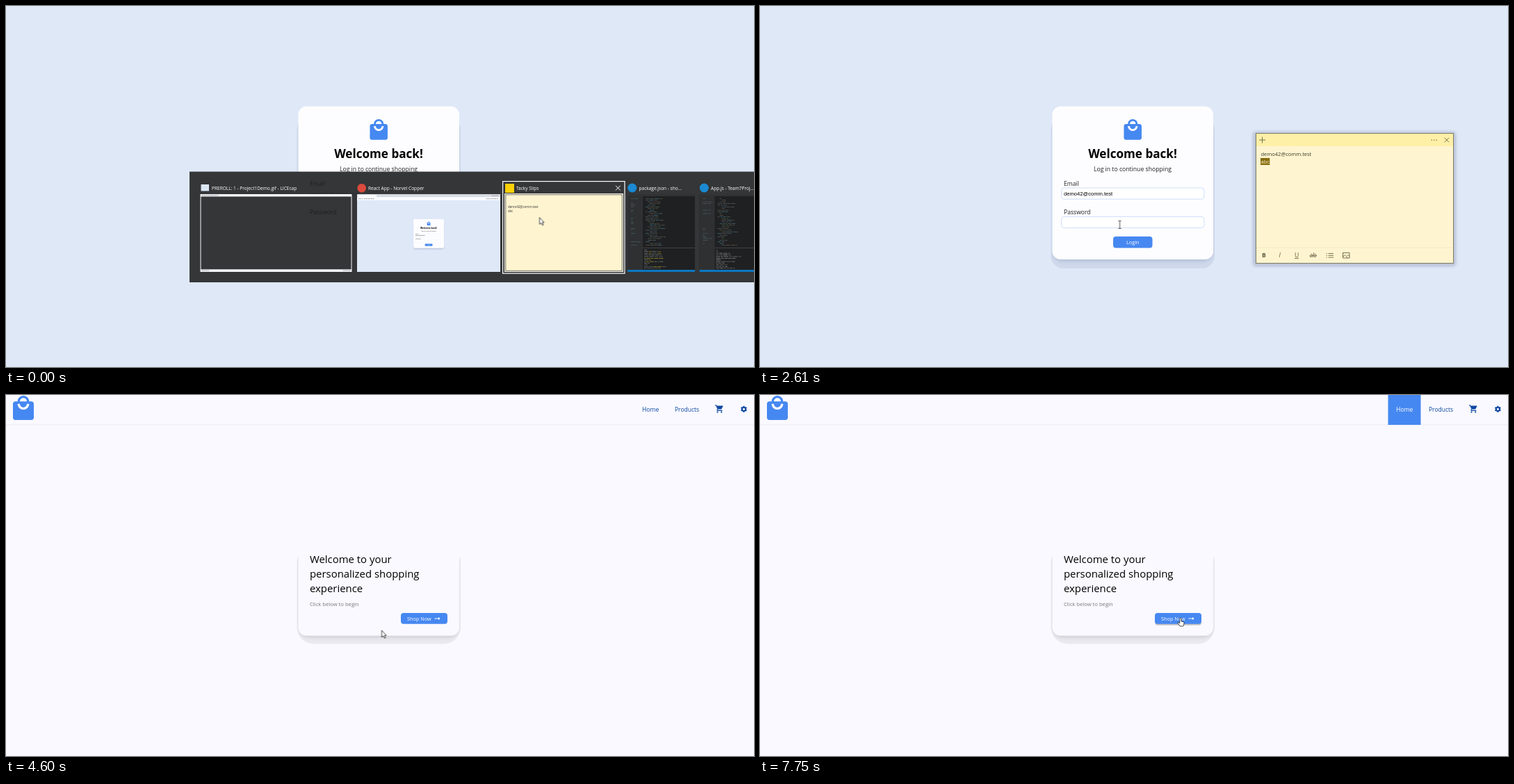
Animation of 1076x520 px, one loop 7.99 s. Source, as an HTML page:

```html
<!DOCTYPE html>
<html lang="en">
<head>
<meta charset="utf-8">
<title>Shop login</title>
<style>
html, body { margin: 0; width: 100%; height: 100%; overflow: hidden; background: #dfe8f7; }
svg { display: block; width: 100%; height: 100%; }
text { font-family: "Open Sans", "Noto Sans", sans-serif; white-space: pre; }
.mid { text-anchor: middle; }
.field { fill: #fff; stroke: #cfdff8; }
.value { font: 7.6px "Liberation Sans", Arial, sans-serif; }
.blue { fill: #4688f1; }
.navy { fill: #0d47a1; }
.label text { font-size: 6.55px; fill: #fff; }
.line { fill: none; stroke: #6b6545; stroke-width: .9; }
.ring { fill: none; stroke: #101014; stroke-width: 1.3; }

.step { animation: 7.99s step-end infinite; }
#switcher { animation-name: switcher; }
#note { animation-name: note; }
#picked { animation-name: picked; }
#focus { animation-name: focus; }
#caret { animation-name: caret; }
#dots { animation-name: dots; }
#press { animation-name: press; }
#home { animation-name: home; }
#lift { animation-name: lift; }
#arrow { animation-name: arrow; }
#beam { animation-name: beam; }
#resize { animation-name: resize; }
#hand { animation-name: hand; }
#active { animation: active 7.99s linear infinite; }
#pointer { animation: pointer 7.99s linear infinite; }

@keyframes switcher { 0% { opacity: 1 } .751%, 100% { opacity: 0 } }
@keyframes note { 0% { opacity: 0 } .751% { opacity: 1 } 33.417%, 100% { opacity: 0 } }
@keyframes picked {
  0% { clip-path: inset(0 0 0 100%) }
  13.4% { clip-path: inset(0 0 0 66%) }
  15% { clip-path: inset(0 0 0 33%) }
  16.2%, 100% { clip-path: inset(0) }
}
@keyframes focus { 0% { opacity: 0 } 33.417% { opacity: 1 } 52.941%, 100% { opacity: 0 } }
@keyframes caret { 0% { opacity: 0 } 34.168% { opacity: 1 } 38.798%, 100% { opacity: 0 } }
@keyframes dots {
  0% { clip-path: inset(0 100% 0 0) }
  38.798% { clip-path: inset(0 66% 0 0) }
  40.3% { clip-path: inset(0 33% 0 0) }
  41.802%, 100% { clip-path: inset(0) }
}
@keyframes press { 0% { opacity: 0 } 52.941%, 100% { opacity: 1 } }
@keyframes home { 0% { opacity: 0 } 57.572%, 100% { opacity: 1 } }
@keyframes lift { 0% { opacity: 0 } 95.494%, 100% { opacity: 1 } }
@keyframes active { 0%, 58.323% { opacity: 0 } 59.7%, 100% { opacity: 1 } }
@keyframes arrow {
  0% { opacity: 1 } .751% { opacity: 0 } 20.901% { opacity: 1 } 31.915% { opacity: 0 }
  43.2% { opacity: 1 } 49.186% { opacity: 0 } 57.572% { opacity: 1 } 95.494%, 100% { opacity: 0 }
}
@keyframes beam {
  0% { opacity: 0 } .751% { opacity: 1 } 17.6% { opacity: 0 }
  31.915% { opacity: 1 } 43.2%, 100% { opacity: 0 }
}
@keyframes resize { 0% { opacity: 0 } 17.6% { opacity: 1 } 20.901%, 100% { opacity: 0 } }
@keyframes hand {
  0% { opacity: 0 } 49.186% { opacity: 1 } 57.572% { opacity: 0 } 95.494%, 100% { opacity: 1 }
}
@keyframes pointer {
  0%, .751% { transform: translate(767.5px, 304.5px) }
  9.637%, 11.139% { transform: translate(744px, 228px) }
  18.6%, 20.901% { transform: translate(709.5px, 228.5px) }
  31.289% { transform: translate(519px, 295px) }
  31.915%, 41.9% { transform: translate(517.5px, 315px) }
  47.685%, 48.8% { transform: translate(553px, 349px) }
  49.186% { transform: translate(548px, 345px) }
  52.941%, 64.33% { transform: translate(540.5px, 339px) }
  67% { transform: translate(338px, 306px) }
  70% { transform: translate(590px, 308px) }
  72% { transform: translate(606px, 165px) }
  73.842% { transform: translate(226px, 84px) }
  77.5% { transform: translate(60px, 34px) }
  78.4% { transform: translate(27px, 36px) }
  79.099%, 79.85% { transform: translate(33.5px, 44px) }
  84.23% { transform: translate(712px, 127px) }
  87% { transform: translate(806px, 79px) }
  90% { transform: translate(688px, 192px) }
  92% { transform: translate(612px, 240px) }
  93.992%, 95.4% { transform: translate(600px, 313px) }
  95.494% { transform: translate(603px, 321px) }
  96.996%, 100% { transform: translate(605px, 321px) }
}
</style>
</head>
<body>
<svg viewBox="0 0 1076 520" preserveAspectRatio="none">
  <defs>
    <path id="bag" class="blue" d="M19 6h-2c0-2.76-2.24-5-5-5S7 3.24 7 6H5c-1.1 0-2 .9-2 2v12c0 1.1.9 2 2 2h14c1.1 0 2-.9 2-2V8c0-1.1-.9-2-2-2zm-7-3c1.66 0 3 1.34 3 3H9c0-1.66 1.34-3 3-3zm0 10c-2.76 0-5-2.24-5-5h2c0 1.66 1.34 3 3 3s3-1.34 3-3h2c0 2.76-2.24 5-5 5z"/>
    <filter id="soft" x="-10%" y="-10%" width="120%" height="120%"><feGaussianBlur stdDeviation=".5"/></filter>
    <filter id="blur" x="-10%" y="-10%" width="120%" height="120%"><feGaussianBlur stdDeviation="2"/></filter>
  </defs>

  <rect width="1076" height="520" fill="#dfe8f7"/>

  <g id="login">
    <rect x="418.5" y="160" width="235.5" height="218" rx="18" fill="#1e3a6e" opacity=".08" filter="url(#soft)"/>
    <rect x="422" y="170" width="228" height="198.5" rx="13" fill="#1e3a6e" opacity=".13" filter="url(#blur)"/>
    <rect x="420.5" y="144.5" width="231.5" height="220.5" rx="12" fill="#fdfdff"/>
    <use href="#bag" transform="translate(519.2 161.6) scale(1.417)"/>
    <text class="mid" x="536" y="219" font-size="17.1" font-weight="700">Welcome back!</text>
    <text class="mid" x="536" y="238.3" font-size="8.67" fill="#222">Log in to continue shopping</text>
    <text x="437" y="259.3" font-size="8.6" fill="#222">Email</text>
    <rect class="field" x="433.5" y="262" width="205.5" height="16.2" rx="4"/>
    <text class="value" x="437" y="273">demo42@comm.test</text>
    <text x="437" y="300.3" font-size="8.6" fill="#222">Password</text>
    <rect class="field" x="433.5" y="303.4" width="205.5" height="16.2" rx="4"/>
    <rect id="focus" class="ring step" x="433.5" y="303" width="206" height="17" rx="4"/>
    <path id="caret" class="step" d="M437.5 307v9" stroke="#000" stroke-width=".8"/>
    <g id="dots" class="step">
      <circle cx="438.4" cy="311.3" r="1.3"/><circle cx="441.2" cy="311.3" r="1.3"/><circle cx="444" cy="311.3" r="1.3"/>
    </g>
    <rect class="blue" x="508" y="332" width="56.5" height="16.5" rx="4"/>
    <text class="mid" x="536.3" y="343.2" font-size="7.4" fill="#fff">Login</text>
    <rect id="press" class="ring step" x="507.6" y="331.8" width="57" height="16.8" rx="2"/>
  </g>

  <g id="note" class="step">
    <rect x="709" y="181" width="292" height="194" rx="4" fill="#1e2f55" opacity=".2" filter="url(#blur)"/>
    <rect x="713.5" y="183.5" width="284" height="187" fill="#fef5d0"/>
    <rect x="713.5" y="183.5" width="284" height="18.5" fill="#fff0a8"/>
    <path d="M714 348h283" stroke="#f3eac2"/>
    <rect x="713.5" y="183.5" width="284" height="187" fill="none" stroke="#807b62"/>
    <path class="line" d="M718 193h9M722.5 188.5v9M984.5 189.7l6.6 6.6m0-6.6l-6.6 6.6"/>
    <path class="line" d="M965.5 193.2h8.5" stroke-dasharray="1.3 2.2" style="stroke-width:1.3"/>
    <text x="720.5" y="216.3" font-size="7.5" fill="#3b3829">demo42@comm.test</text>
    <text x="720.5" y="227" font-size="7.5" fill="#3b3829">abc</text>
    <g id="picked" class="step">
      <rect x="720" y="218.8" width="13.5" height="10.2" fill="#866c0c"/>
      <text x="720.5" y="227" font-size="7.5" fill="#fff6d2">abc</text>
    </g>
    <g fill="#5c573e" font-size="8.5">
      <text x="722" y="362.4" font-weight="700">B</text>
      <text x="746.5" y="362.4" font-style="italic">I</text>
      <text x="769" y="362">U</text>
      <text x="790.8" y="362.4">ab</text>
    </g>
    <path class="line" d="M769 363.5h6M790.5 359.6h10.5M817.5 356.5h7.5m-7.5 2.8h7.5m-7.5 2.8h7.5M814.5 356.5h1.3m-1.3 2.8h1.3m-1.3 2.8h1.3M838.5 355.5h9.5v7.5h-9.5zl0 6 3-3 4 4.5m-1-3 1.5-1.5 2 2"/>
  </g>

  <g id="switcher" class="step">
    <rect x="264" y="238.6" width="812" height="159.4" fill="#343638"/>
    <g font-size="8.6" fill="#1d1f20">
      <text x="437" y="259.3">Email</text>
      <text class="value" x="437" y="273" fill="#292b2d">demo42@comm.test</text>
    </g>
    <rect x="279.5" y="271" width="218" height="112" fill="#f5f7fa"/>
    <rect x="280.5" y="274.5" width="216" height="104.8" fill="#343638"/>
    <path d="M282 272.8h24M282 381h10M485 381h11" stroke="#777" stroke-width=".8" stroke-dasharray="2 .6"/>
    <text x="437" y="300.3" font-size="8.6" fill="#1d1f20">Password</text>

    <rect x="505" y="271" width="206" height="112" fill="#dfe8f7"/>
    <rect x="505" y="271" width="206" height="4.5" fill="#d6dae1"/>
    <rect x="505" y="275.2" width="206" height="4.6" fill="#fbfcfe"/>
    <rect x="506" y="272" width="27" height="4" fill="#fbfcfe"/>
    <path d="M507 277.6h6m2 0h15M691 277.6h17M699 273.2h9" stroke="#777" stroke-width=".9" stroke-dasharray="1.5 1"/>
    <use href="#login" transform="translate(506.2 279.45) scale(.19)"/>

    <rect x="714.6" y="252.6" width="175.4" height="132.6" fill="none" stroke="#fff" stroke-width="1.2"/>
    <rect x="717.6" y="270.6" width="169.8" height="111.9" fill="#fef5d0" stroke="#fffbe8"/>
    <rect x="718.8" y="271.8" width="167.4" height="109.5" fill="none" stroke="#5d5f61" stroke-width=".9"/>
    <text x="722" y="290.5" font-size="4.5" fill="#333">demo42@comm.test</text>
    <text x="722" y="296.5" font-size="4.5" fill="#333">abc</text>
    <path d="M877 258.7l6.8 6.8m0-6.8l-6.8 6.8" stroke="#fff"/>

    <g id="editors"></g>

    <g class="label">
      <rect x="280.5" y="257" width="11.5" height="9.5" fill="#dce6f4"/>
      <text x="296" y="264.8">PREROLL: 1 - Project1Demo.gif - LICEcap</text>
      <circle cx="511.7" cy="262.2" r="6.3" fill="#db4a3d"/>
      <text x="521" y="264.8">React App - Norvel Copper</text>
      <rect x="718" y="256" width="13" height="13" fill="#fbd008"/>
      <text x="734" y="264.8">Tacky Slips</text>
      <circle cx="900.8" cy="262" r="6.5" fill="#1a8ad4"/>
      <text x="910.5" y="264.8">package.json - sho...</text>
      <circle cx="1004.3" cy="262" r="6.5" fill="#1a8ad4"/>
      <text x="1014" y="264.8">App.js - Team7Proj...</text>
    </g>
  </g>

  <g id="home" class="step">
    <rect width="1076" height="520" fill="#f9f9ff"/>
    <path d="M0 43h1076" stroke="#ebebf2"/>
    <use href="#bag" transform="translate(5 -.7) scale(1.667)"/>
    <text class="navy" x="915" y="24.3" font-size="8.6">Home</text>
    <g id="active">
      <rect class="blue" x="903.5" y="0" width="47" height="43"/>
      <text x="915" y="24.3" font-size="8.6" fill="#fff">Home</text>
    </g>
    <text class="navy" x="962" y="24.3" font-size="8.5">Products</text>
    <path class="navy" transform="translate(1019.5 13.2) scale(.571)" d="M7 18a2 2 0 1 0 0 4 2 2 0 0 0 0-4zM1 2v2h2l3.6 7.59-1.35 2.45c-.7 1.3.3 2.96 1.75 2.96h12v-2H7.42c-.2 0-.3-.2-.22-.37l.9-1.63h7.45c.75 0 1.41-.41 1.75-1.03l3.58-6.49c.4-.7-.1-1.48-.88-1.48H5.21l-.94-2zM17 18a2 2 0 1 0 0 4 2 2 0 0 0 0-4z"/>
    <g fill="none" stroke="#0d47a1">
      <circle cx="1061.4" cy="20.3" r="2.6" stroke-width="2"/>
      <circle cx="1061.4" cy="20.3" r="3.9" stroke-width="1.4" pathLength="12" stroke-dasharray="1 1" stroke-dashoffset="1.5"/>
    </g>

    <rect x="418.5" y="217" width="235.5" height="141.5" rx="24" fill="#000" opacity=".06" filter="url(#soft)"/>
    <rect x="422" y="225" width="228" height="125" rx="13" fill="#000" opacity=".09" filter="url(#blur)"/>
    <rect x="420.5" y="207" width="231.5" height="139.8" rx="12" fill="#f9f9ff"/>
    <g font-size="14.9">
      <text x="437" y="242">Welcome to your</text>
      <text x="437" y="263">personalized shopping</text>
      <text x="437" y="283.8">experience</text>
    </g>
    <text x="437" y="303.7" font-size="7.65" fill="#77777d">Click below to begin</text>
    <rect id="lift" class="step" x="568" y="316" width="67" height="15.8" rx="4" fill-opacity=".22" filter="url(#soft)"/>
    <rect class="blue" x="568" y="314" width="67" height="15.7" rx="4"/>
    <text x="577" y="325" font-size="7.3" fill="#fff">Shop Now</text>
    <path d="M616.5 322h6" stroke="#fff"/>
    <path d="M622 320l2.6 2-2.6 2z" fill="#fff"/>
  </g>

  <g id="pointer" fill="#fff" stroke="#1c1c1c" stroke-width=".8" stroke-linejoin="round">
    <path id="arrow" class="step" d="M0 0V10L2.3 8l1.7 3.4 1.6-.7L4 7.3H6.6z"/>
    <path id="beam" class="step" fill="none" d="M-2-5.5h1.4l.6.5.6-.5H2M-2 5.5h1.4l.6-.5.6.5H2M0-5V5"/>
    <path id="resize" class="step" d="M-6 0l3-3v2h6v-2l3 3-3 3v-2h-6v2z"/>
    <path id="hand" class="step" d="M-1.2 1.2a1.1 1.1 0 0 1 2.2 0V5l3.2.7q1 .3.9 1.4l-.6 3.2-.8 1.7h-4.6l-3-4.2q-.5-1.2.6-1.5l2.1 1.5z"/>
  </g>
</svg>
<script>
const editors = document.getElementById('editors');
let seed = 7;
const rand = () => (seed = (seed * 16807) % 2147483647) / 2147483647;

function box(x, y, width, height, fill) {
  const r = document.createElementNS('http://www.w3.org/2000/svg', 'rect');
  for (const [k, v] of Object.entries({ x, y, width, height, fill })) r.setAttribute(k, v);
  editors.append(r);
}

function words(x, y, count, colors) {
  for (let i = 0; i < count; i++) {
    const w = 2 + rand() * 5;
    box(x, y, w, .7, colors[Math.floor(rand() * colors.length)]);
    x += w + 1;
  }
}

function editor(x, accent) {
  box(x, 271, 97, 112, '#1f2021');
  box(x, 271, 22, 109, '#2e3032');
  box(x, 271, 97, 3, '#303234');
  for (let y = 277; y < 345; y += 2.4) {
    if (rand() < .45) words(x + 5, y, 1 + Math.floor(rand() * 2), ['#55595c', '#466b62']);
    words(x + 26 + Math.floor(rand() * 3) * 3, y, 1 + Math.floor(rand() * 4), ['#4a7285', '#6d574b', '#4c6451', '#5d6163']);
  }
  box(x + 22, 348, 75, .6, '#55585a');
  for (let y = 351; y < 378; y += 2.4) words(x + 24, y, 1 + Math.floor(rand() * 6), ['#7f8385', '#686c6e', accent]);
  box(x, 380, 97, 3, '#0b78c2');
}

editor(894, '#a89c2c');
editor(997.5, '#9a9d9f');
</script>
</body>
</html>
```
